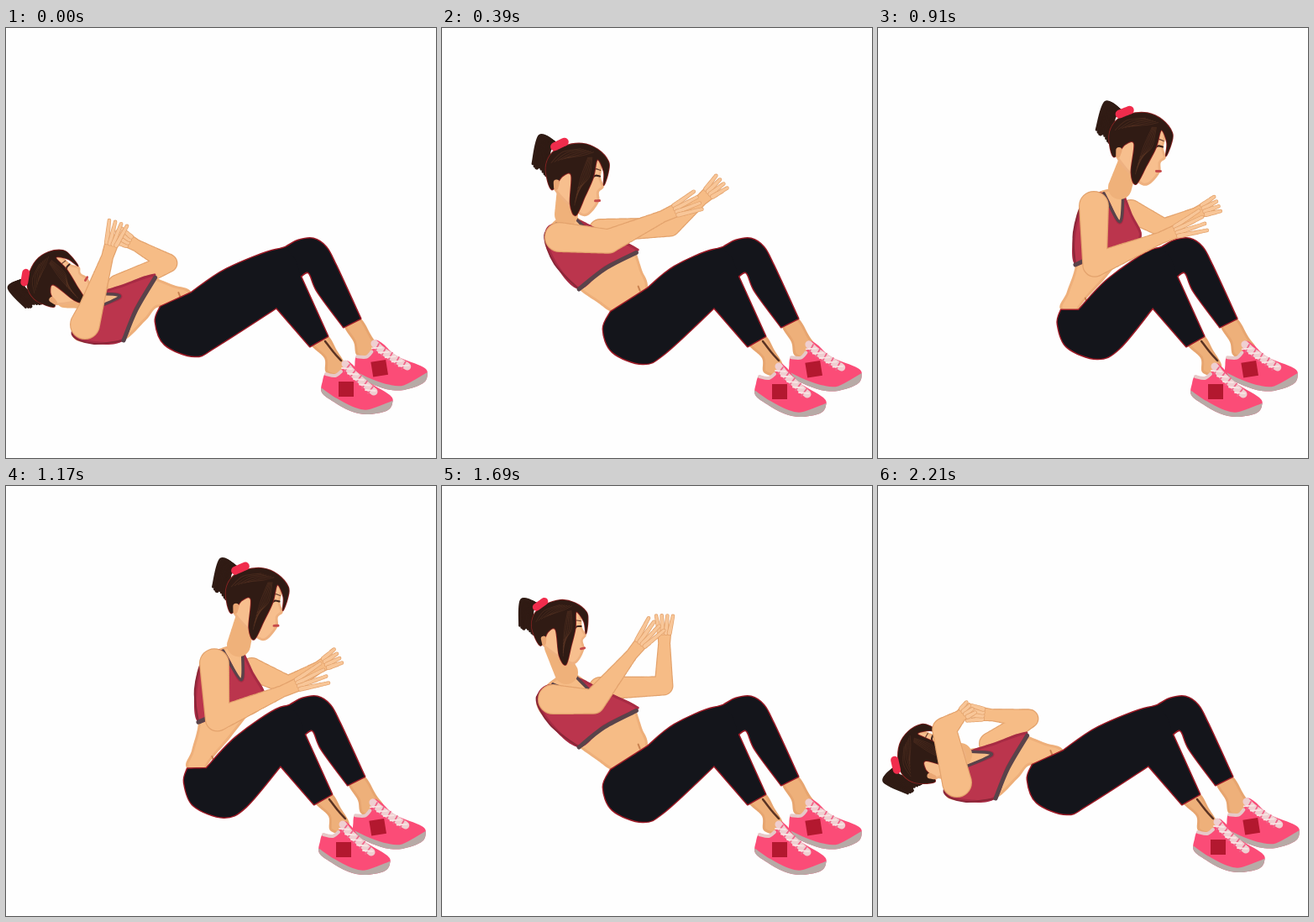
These frames come from a looping animation (512 px wide and 512 px high, 2340 ms). An HTML page with a canvas:

```html
<!DOCTYPE html>
<html lang="en">
<head>
<meta charset="utf-8">
<title>Sit-up</title>
<style>
html, body { margin: 0; width: 100%; height: 100%; overflow: hidden; background: #fefefe; }
canvas { display: block; width: 100vw; height: 100vh; }
</style>
</head>
<body>
<canvas id="stage" width="512" height="512"></canvas>
<script>
const ctx = document.getElementById('stage').getContext('2d');
const STEP = 130, LOOP = 2340;
const PIVOT = [215, 385], SEAT = 43;
const SKIN = '#f6bc86', SKIN_EDGE = '#e3a26c', SKIN_RIM = 'rgba(190,105,55,.16)';
const HAIR = '#301b14', CLOTH = '#bb354d', TRIM = '#59434a', PANTS = '#14151b', EDGE = '#9c1a26';

// Joints of each pose; head = centre, tilt in degrees, scale.
const lie = {
  pelvis: [221, 348], front: [221, 315], back: [184, 332],
  rib: [140, 372], breast: [170, 294], neck: [98, 320], shoulder: [94, 353],
  elbow: [101, 334], hand: [133, 234], farElbow: [193, 280], farHand: [132, 246],
  head: [61, 303], turn: [-58, .9]
};
const reach = {
  pelvis: [235, 357], front: [245, 310], back: [201, 338],
  rib: [163, 311], breast: [229, 260], neck: [148, 222], shoulder: [140, 249],
  elbow: [198, 254], hand: [303, 206], farElbow: [272, 237], farHand: [332, 184],
  head: [159, 177], turn: [-3, 1]
};
const rise = {
  pelvis: [246, 355], front: [237, 337], back: [206, 340],
  rib: [198, 283], breast: [280, 254], neck: [223, 196], shoulder: [202, 215],
  elbow: [232, 262], hand: [354, 196], farElbow: [312, 237], farHand: [370, 181],
  head: [240, 140], turn: [0, 1]
};
const sit = {
  pelvis: [257, 351], front: [239, 336], back: [218, 336],
  rib: [235, 282], breast: [314, 246], neck: [288, 190], shoulder: [257, 212],
  elbow: [258, 282], hand: [385, 230], farElbow: [340, 238], farHand: [403, 210],
  head: [310, 140], turn: [1, 1]
};
const lower = { ...rise, elbow: [213, 263], hand: [333, 198], farElbow: [314, 234], farHand: [346, 174],
  head: [227, 133], turn: [-12, .96] };
const lean = { ...reach, shoulder: [132, 254], elbow: [180, 257], hand: [254, 166], farElbow: [264, 238], farHand: [265, 156],
  head: [140, 172], turn: [-13, .9] };
const rest = { ...lie, elbow: [79, 290], hand: [110, 264], farElbow: [180, 277], farHand: [108, 270],
  head: [60, 323], turn: [-80, .93] };

const linear = u => u;
const KEYS = [
  [0, lie, u => u ** 1.2], [390, reach, linear], [650, rise, linear],
  [910, sit, linear], [1120, sit, linear], [1430, lower, linear],
  [1690, lean, u => 1 - (1 - u) ** 1.5], [2210, rest, linear], [LOOP, lie, linear]
];
const STRAIGHT = ['pelvis', 'front', 'back', 'turn'];

const mix = (a, b, u) => a + (b - a) * u;
const mid = (p, q, u = .5) => [mix(p[0], q[0], u), mix(p[1], q[1], u)];
const add = (p, x, y) => [p[0] + x, p[1] + y];
const pairs = list => list.flatMap((v, i) => i % 2 ? [] : [[v, list[i + 1]]]);
const onCircle = (c, r, a) => add(c, r * Math.cos(a), r * Math.sin(a));

// The upper body swings about the hips, so blend angle and radius.
function swing(p, q, u) {
  const polar = ([x, y]) => [Math.hypot(x - PIVOT[0], y - PIVOT[1]), Math.atan2(y - PIVOT[1], x - PIVOT[0])];
  return onCircle(PIVOT, ...mid(polar(p), polar(q), u));
}

function poseAt(t) {
  const i = KEYS.findIndex(k => k[0] > t) - 1;
  const [t0, a, ease] = KEYS[i], [t1, b] = KEYS[i + 1];
  const u = ease((t - t0) / (t1 - t0));
  const pose = {};
  for (const j in a) pose[j] = (STRAIGHT.includes(j) ? mid : swing)(a[j], b[j], u);
  return pose;
}

// Smooth curve through points; a repeated point makes a corner.
function curve(pts, closed = true) {
  const path = new Path2D(), n = pts.length;
  const at = i => closed ? pts[(i + n) % n] : pts[Math.max(0, Math.min(n - 1, i))];
  path.moveTo(...pts[0]);
  for (let i = 0; i < (closed ? n : n - 1); i++) {
    const [p, q, r, s] = [at(i - 1), at(i), at(i + 1), at(i + 2)];
    if (q[0] === r[0] && q[1] === r[1]) continue;
    path.bezierCurveTo(q[0] + (r[0] - p[0]) / 6, q[1] + (r[1] - p[1]) / 6,
      r[0] - (s[0] - q[0]) / 6, r[1] - (s[1] - q[1]) / 6, r[0], r[1]);
  }
  if (closed) path.closePath();
  return path;
}

function stroke(path, color, width) {
  ctx.strokeStyle = color;
  ctx.lineWidth = width;
  ctx.stroke(path);
}
const line = (pts, color, width) => stroke(curve(pts, false), color, width);

// Fill with a soft darker rim kept inside the outline.
function solid(pts, fill, rim, width = 6) {
  const path = curve(pts);
  ctx.fillStyle = fill;
  ctx.fill(path);
  if (!rim) return;
  ctx.save();
  ctx.clip(path);
  stroke(path, rim, width);
  ctx.restore();
}

// Tapered limb: circles swept between stations of [point, radius].
function limb(stations, color, inset = 0) {
  const path = new Path2D();
  for (let i = 1; i < stations.length; i++) {
    const [[p, r], [q, s]] = [stations[i - 1], stations[i]];
    for (let k = 0; k <= 40; k++) {
      const c = mid(p, q, k / 40), radius = mix(r, s, k / 40) - inset;
      path.moveTo(c[0] + radius, c[1]);
      path.arc(...c, radius, 0, 7);
    }
  }
  ctx.fillStyle = color;
  ctx.fill(path);
}

function arm(shoulder, elbow, tip, size) {
  const along = u => mid(elbow, tip, u);
  const dir = Math.atan2(tip[1] - elbow[1], tip[0] - elbow[0]);
  const reachLen = Math.hypot(tip[0] - elbow[0], tip[1] - elbow[1]) * .25;
  const shape = [[shoulder, size], [elbow, size * .82], [along(.62), 7.5], [along(.78), 8.5]];
  limb(shape, SKIN_EDGE);
  limb(shape, SKIN, 1.2);
  for (let i = -1.5; i <= 1.5; i++) {
    const root = onCircle(along(.77), 4 * i, dir + Math.PI / 2);
    const finger = [[root, 3], [onCircle(root, reachLen, dir + i * .13), 2.3]];
    limb(finger, SKIN_EDGE);
    limb(finger, '#f8c698', .7);
  }
}

function body({ pelvis, front, back, rib, breast, neck, shoulder }) {
  const nape = mid(breast, shoulder, 1.2);
  const spine = mid(breast, mid(nape, rib), 1.1);
  const under = mid(breast, front, .15);
  solid([front, mid(under, front), under, breast, mid(neck, breast, .4), neck, nape, spine, rib, mid(rib, back, .6), back, pelvis],
    SKIN, SKIN_RIM);
  line([mid(mid(front, breast, .2), back, .2), add(mid(mid(front, breast, .2), back, .2), 2, 5)], '#c98250', 2);

  const strap = mid(neck, nape, .45);
  const scoop = [strap, mid(mid(neck, breast), rib, .2), mid(neck, breast, .15)];
  const band = [under, mid(mid(under, rib), shoulder, .06), rib];
  solid([...scoop, mid(neck, breast, .6), breast, ...band, spine, nape], CLOTH, 'rgba(110,15,40,.25)');
  line([rib, spine, nape, strap], '#8a2638', 2);
  line(scoop, TRIM, 3.5);
  line(band, TRIM, 5);
}

// Head drawn upright round its centre, then turned.
const CENTRE = [240, 140];
const FACE = pairs([262,108, 272,126, 270,142, 273,154, 267,160, 266,172, 252,187, 238,182, 214,155, 212,136, 230,113]);
const CAP = pairs([205,130, 212,112, 228,103, 250,101, 268,109, 280,124, 279,137, 273,152, 274,136, 267,121, 261,142,
  250,164, 238,186, 232,172, 235,138, 224,139, 211,154]);

function head({ head: [x, y], turn: [tilt, size], neck }) {
  const a = tilt * Math.PI / 180;
  const nape = onCircle([x, y], 23 * size, a + 2.1);
  limb([[nape, 12], [neck, 14]], '#efb17a');

  ctx.save();
  ctx.translate(x, y);
  ctx.rotate(a);
  ctx.scale(size, size);
  ctx.translate(-CENTRE[0], -CENTRE[1]);
  solid(FACE, '#f7bf8e', SKIN_RIM);
  line(pairs([260,142, 264,140, 269,141]), '#3a211b', 2.2);
  line(pairs([259,135, 264,132, 270,134]), '#6a4030', 1.3);
  line(pairs([262,170, 267,170]), '#c64a4a', 3);

  for (let i = 0; i < 16; i++) {
    const fan = i / 15, wisp = 3 * Math.sin(i * 7);
    const tip = [mix(190, 209, fan) + wisp / 3, mix(122, 138, fan) + wisp];
    line([[221, 101], [mix(200, 211, fan), mix(89, 107, fan)], tip], HAIR, 3.2);
  }
  stroke(curve(CAP), '#8a2322', 1.8);
  solid(CAP, HAIR);
  for (let i = 0; i < 6; i++) {
    line([[212 + i * 4, 122 - i], [226 + i * 5, 110 + i], [248 + i * 3, 107 + i]], 'rgba(120,72,48,.3)', 1);
    line([[256 + i, 118], [246 + i * 2, 142], [237 + i, 174 - i * 4]], 'rgba(120,72,48,.3)', 1);
  }
  limb([[[217, 103], 5], [[229, 98], 5]], '#f02c4c');
  limb([[[217, 146], 3.6], [[216, 152], 2.6]], '#eaa673');
  ctx.restore();
}

const SHOE = pairs([381,411, 393,414, 400,406, 405,396, 414,402, 428,419, 457,437, 460,447, 453,456, 430,460, 410,456, 390,445, 376,434, 377,420]);

function shoe(x, y, angle) {
  ctx.save();
  ctx.translate(x, y);
  ctx.rotate(angle);
  ctx.translate(-377, -411);
  solid(SHOE, '#fb4c77');
  ctx.save();
  ctx.clip(curve(SHOE));
  line(pairs([374,433, 390,444, 411,455, 431,459, 462,448]), '#b7aaa6', 9);
  ctx.restore();
  line(pairs([381,412, 392,414, 399,409]), '#e6c9c8', 4);
  line(pairs([404,400, 413,411, 438,433]), '#efcfd1', 9);
  for (let i = 0; i < 5; i++) {
    const lace = [404 + i * 7, 403 + i * 6.5];
    line([add(lace, 5, -2), add(lace, -1, 6)], '#f0668a', 1.8);
    line([add(lace, -4, 2), add(lace, 8, 3)], '#f8e4e3', 1.8);
  }
  ctx.fillStyle = '#b3182f';
  ctx.fillRect(396, 421, 18, 18);
  ctx.restore();
}

const KNEE = [322, 264];
const FAR_LEG = pairs([322,290, 318,268, 333,261, 348,253, 366,251, 381,261, 393,283, 422,346, 422,346,
  402,356, 402,356, 371,314, 360,291, 345,298]);
const NEAR_SHIN = pairs([342,272, 350,294, 350,294, 383,367, 383,367, 362,379, 362,379, 322,333, 322,333]);
const FAR_ANKLE = pairs([403,354, 421,345, 436,368, 445,382, 436,394, 418,390, 414,374]);
const NEAR_ANKLE = pairs([363,376, 382,366, 394,384, 404,402, 397,414, 381,410, 379,393]);

function legs({ pelvis, front, back }) {
  const knee = (pelvis[0] - 221) / 7;
  const foot = Math.min(1, (pelvis[0] - 221) / 14);
  const shift = list => list.map(p => add(p, knee, 0));
  solid(shift(FAR_ANKLE), '#eeb07a', SKIN_RIM);
  shoe(414 - foot * 2, 391 + foot, -.16);
  solid(shift(NEAR_ANKLE), '#eeb07a', SKIN_RIM);
  line(shift(pairs([380,373, 390,386, 399,396])), '#5a3323', 2.5);
  shoe(377 - foot * 3, 411 + foot * 3, 0);

  const seat = [45, 85, 138, 178].map(deg => onCircle(pelvis, SEAT, deg * Math.PI / 180));
  const [top] = shift([KNEE]);
  const thigh = [front, front, add(mid(front, top, .45), -4, -5), top, ...shift(NEAR_SHIN), ...seat, back, back];
  const parts = [shift(FAR_LEG), thigh];
  parts.forEach(p => stroke(curve(p), EDGE, 3));
  parts.forEach(p => solid(p, PANTS));
}

function draw(t) {
  const pose = poseAt(t);
  ctx.fillStyle = '#fefefe';
  ctx.fillRect(0, 0, 512, 512);
  arm(mid(pose.neck, pose.breast), pose.farElbow, pose.farHand, 14);
  body(pose);
  legs(pose);
  head(pose);
  arm(pose.shoulder, pose.elbow, pose.hand, 18);
}

ctx.lineCap = ctx.lineJoin = 'round';
const start = performance.now();
function tick() {
  const t = (performance.now() - start) % LOOP;
  draw(Math.floor(t / STEP) * STEP);
  requestAnimationFrame(tick);
}
tick();
</script>
</body>
</html>
```
